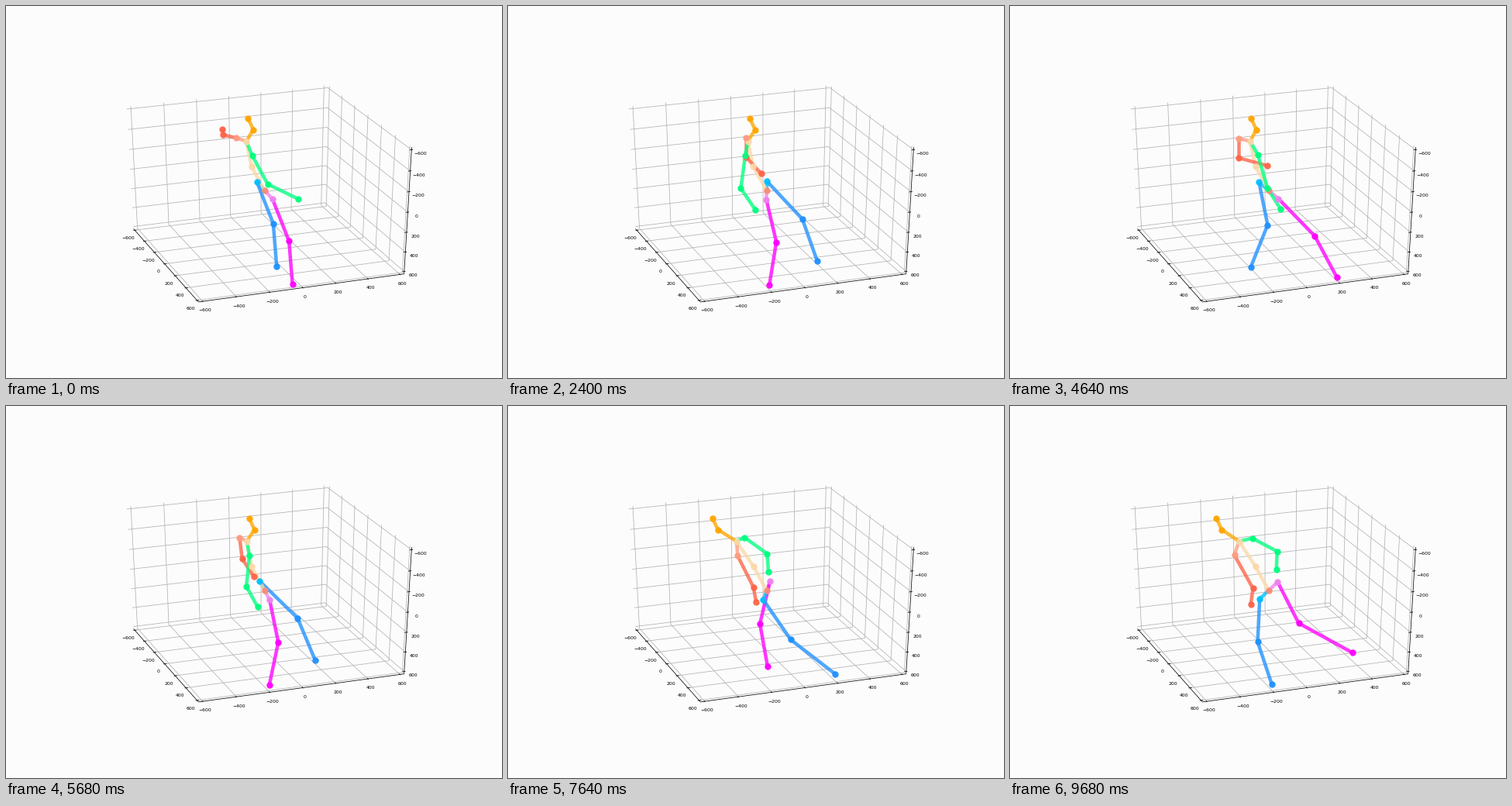
A matplotlib script for the animation above (9.72 s loop, 640x480 px).

```python
import numpy as np
import matplotlib.pyplot as plt
from matplotlib.animation import FuncAnimation
from matplotlib.collections import LineCollection

W, H, DPI = 640, 480, 100
FRAMES, STEP = 243, 40
PX = 72 / DPI                      # one pixel in points
EDGE = 625                         # half size of the plot box
TICKS = range(-600, 601, 200)

GAIT = 3.25                        # seconds for one full stride
LEG = 55.5                         # length of a thigh or a shank
STRETCH = 1.7                      # the view is wider than it is tall

# Bones from back to front; the dot sits at the second joint.
BONES = [
    ("root", "hip_l", "violet"),
    ("hip_l", "knee_l", "magenta"),
    ("knee_l", "ank_l", "magenta"),
    ("root", "hip_r", "deepskyblue"),
    ("hip_r", "knee_r", "dodgerblue"),
    ("knee_r", "ank_r", "dodgerblue"),
    ("root", "spine", "#fbd9a8"),
    ("spine", "neck", "#fbd9a8"),
    ("neck", "nose", "orange"),
    ("nose", "head", "orange"),
    ("neck", "sho_r", "#ff9c80"),
    ("sho_r", "elb_r", "tomato"),
    ("elb_r", "wri_r", "tomato"),
    ("neck", "sho_l", "springgreen"),
    ("sho_l", "elb_l", "springgreen"),
    ("elb_l", "wri_l", "springgreen"),
]
DOTS = [("root", "#f88c74")] + [(end, color) for _, end, color in BONES]


def ease(t, start, end):
    u = np.clip((t - start) / (end - start), 0, 1)
    return u * u * (3 - 2 * u)


def wave(phase):
    return np.cos(2 * np.pi * phase)


def vec(x, y):
    return np.stack(np.broadcast_arrays(x, y), axis=-1).astype(float)


def limb(degrees):
    """Leg bone hanging down, swung to the right by an angle."""
    a = np.radians(degrees)
    return LEG * vec(STRETCH * np.sin(a), np.cos(a))


def leg(hip, phase, walk, facing):
    """Knee and ankle; the foot lands at phase 0 and swings near 0.72."""
    lift = np.exp(-((phase % 1 - 0.72) / 0.12) ** 2)
    thigh = 13 + facing * walk * (6 + 15 * wave(phase))
    flex = 11 + walk * (3 + 33 * lift)
    knee = hip + limb(thigh)
    return knee, knee + limb(thigh - facing * flex)


def pose(t):
    """Screen positions of all joints at the times t."""
    raised = 1 - ease(t, 0, 1.36)          # right arm up at the start
    reach = 1 - ease(t, 1.1, 2.8)          # left arm held forward
    lean = np.exp(-((t - 1.4) / 0.7) ** 2)
    walk = ease(t, 1.4, 2.6)
    turn = ease(t, 4.8, 8.6)
    phase = 0.7 + (t - 3.4) / GAIT
    heading = np.pi * turn + 0.35 * raised + 0.5 * walk * wave(phase - 0.05)
    facing = np.cos(heading)
    side = vec(4 + 18 * np.sin(heading), 12 * facing)
    swing = walk * (1 - turn) * wave(phase)

    def mix(right, left):
        return np.array(right) + turn[:, None] * np.subtract(left, right)

    j = {"root": vec(333.8 + 0 * t, 238)}
    j["hip_l"], j["hip_r"] = j["root"] + side, j["root"] - side
    for s, offset in (("l", 0), ("r", 0.5)):
        j["knee_" + s], j["ank_" + s] = leg(j["hip_" + s], phase + offset, walk, facing)

    j["spine"] = j["root"] + vec(-17 - 4 * lean, -31)
    j["neck"] = j["root"] + vec(-31 + 8 * facing - 8 * lean, -63.5)
    j["nose"] = j["neck"] + vec(-7 + 17 * facing, -15)
    j["head"] = j["nose"] + vec(-7 - 2 * lean, -15)

    chest = j["neck"] + vec(1.5 - 4.5 * facing, 7)
    j["sho_l"], j["sho_r"] = chest + side, chest - side
    j["elb_l"] = j["sho_l"] + mix((1, 43), (32, 17)) + vec(19 * reach + 13 * swing, -6 * reach)
    j["wri_l"] = (j["elb_l"] + mix((17, 27), (-1, 23))
                  + vec(14 * reach + 8 * raised, 7 * reach - 15 * raised))
    j["elb_r"] = j["sho_r"] + mix((0, 25), (24, 43)) - vec(17 * raised, 29 * raised)
    j["wri_r"] = (j["elb_r"] + mix((27, 17), (-3, 21))
                  + vec(11 * swing + 5 * lean - 28 * raised,
                        -8 * swing - 9 * lean - 24 * raised))
    return j


def project(x, y, z):
    """Perspective view of the plot box: 30 degrees up, 20 degrees round."""
    x, y, z = x / 12000, y / 12000, -z / 12000
    ce, se = np.cos(np.pi / 6), np.sin(np.pi / 6)
    ca, sa = np.cos(np.pi / 9), np.sin(np.pi / 9)
    across, back = x * ca + y * sa, x * sa - y * ca
    depth = 1 + back * ce - z * se
    return np.array([334.5 + 2681 * across / depth,
                     237.6 - 1780 * (z * ce + back * se) / depth])


def draw_box(ax):
    E, grid, black = EDGE, [], []

    def seg(group, *points):
        group.append([project(*p) for p in points])

    def label(v, point, offset):
        x, y = project(*point) + offset
        ax.text(x, y, str(v).replace("-", "\u2212"), fontsize=6.1 * PX,
                family="DejaVu Sans", ha="center", va="center")

    for v in TICKS:
        seg(grid, (v, E, E), (v, -E, E), (v, -E, -E))
        seg(grid, (-E, v, E), (E, v, E), (E, v, -E))
        seg(grid, (-E, -E, v), (E, -E, v), (E, E, v))
        seg(black, (v, E + 8, E), (v, E - 12, E))
        seg(black, (-E - 8, v, E), (-E + 12, v, E))
        seg(black, (E + 8, E, v), (E - 12, E, v))
        label(v, (v, E, E), (3, 11.8))
        label(v, (-E, v, E), (-8, 10.2))
        label(v, (E, E, v), (11.5, 5.3))
    seg(black, (-E, E, E), (E, E, E))
    seg(black, (-E, E, E), (-E, -E, E))
    seg(black, (E, E, E), (E, E, -E))
    for lines, color in ((grid, "#b0b0b0"), (black, "black")):
        ax.add_collection(LineCollection(lines, colors=color, linewidths=0.75 * PX, zorder=1))


fig = plt.figure(figsize=(W / DPI, H / DPI), dpi=DPI, facecolor="#fcfcfc")
ax = fig.add_axes([0, 0, 1, 1])
ax.set_xlim(0, W)
ax.set_ylim(H, 0)
ax.axis("off")
draw_box(ax)

JOINTS = pose(np.arange(FRAMES) * STEP / 1000)
bones = [ax.plot([], [], color=color, lw=4.5 * PX, alpha=0.78, zorder=3,
                 solid_capstyle="butt")[0] for _, _, color in BONES]
dots = [ax.plot([], [], "o", color=color, ms=8.4 * PX, mew=0, alpha=0.95,
                zorder=4)[0] for _, color in DOTS]


def update(i):
    for line, (start, end, _) in zip(bones, BONES):
        line.set_data(*np.array([JOINTS[start][i], JOINTS[end][i]]).T)
    for dot, (name, _) in zip(dots, DOTS):
        dot.set_data(*JOINTS[name][i][:, None])
    return bones + dots


anim = FuncAnimation(fig, update, frames=FRAMES, interval=STEP,
                     init_func=lambda: update(0), repeat=True, repeat_delay=0)
plt.show()
```
